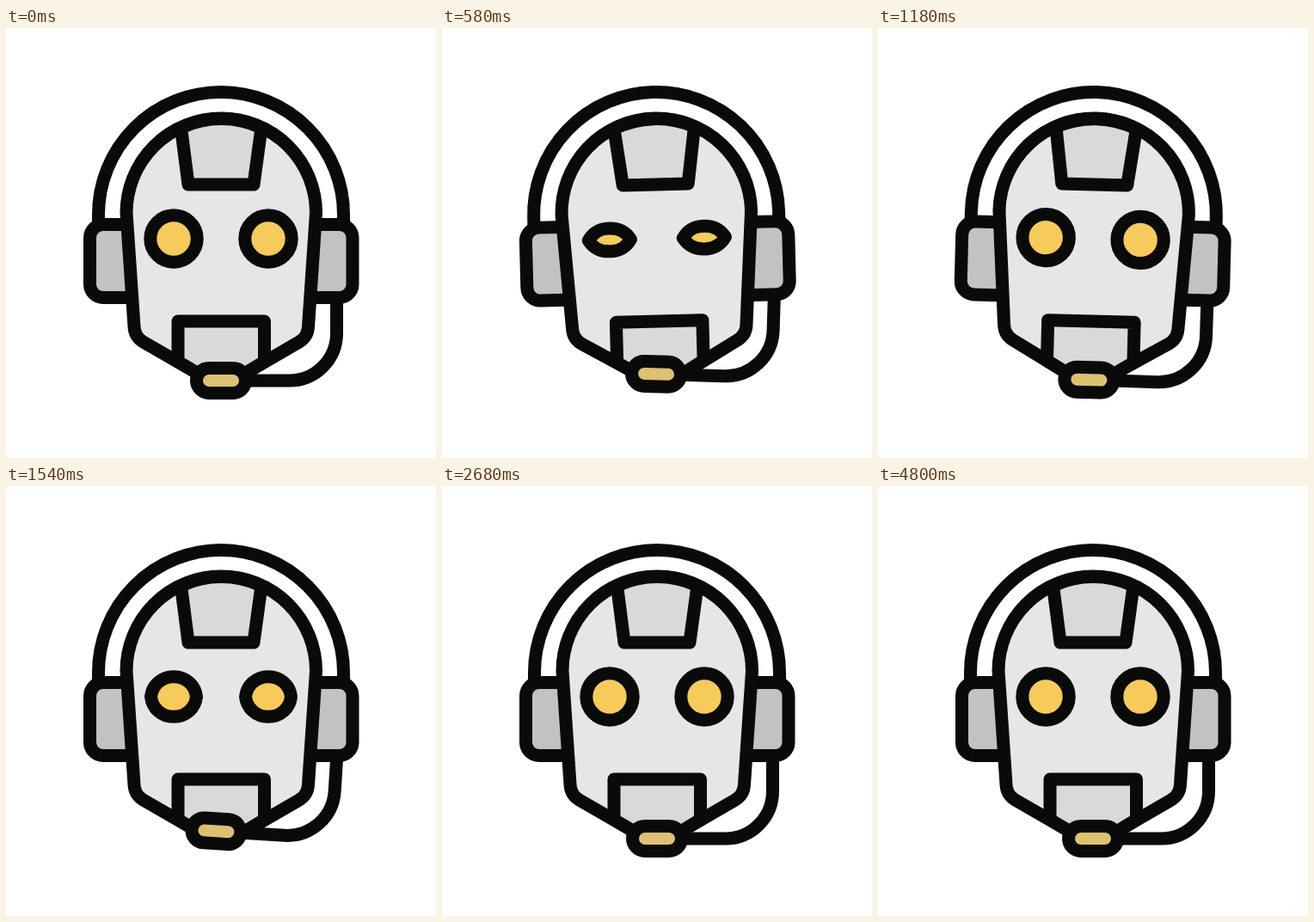
An HTML page for the animation above (4820 ms loop, 500 by 500 pixels).

```html
<!DOCTYPE html>
<html lang="en">
<head>
<meta charset="utf-8">
<title>Robot with headset</title>
<style>
  html, body { margin: 0; width: 100%; height: 100%; overflow: hidden; background: #fff; }
  svg { display: block; width: 100%; height: 100%; }
  path, rect { stroke: #0a0a0a; stroke-width: 15; stroke-linecap: round; stroke-linejoin: round; fill: none; }
  .ear { fill: #c2c2c2; }
  .face { fill: #e6e6e6; }
  .plate { fill: #d9d9d9; }
  .eye { fill: #f6cb5c; }
  .mic { fill: #dec073; }
</style>
</head>
<body>
<svg viewBox="0 0 500 500">
  <g id="head">
    <path d="M107.5 226V217A142.5 142.5 0 0 1 392.5 217V226"/>
    <path class="ear" d="M150 228.5H113A15.5 15.5 0 0 0 97.5 244V298A15.5 15.5 0 0 0 113 313.5H150Z"/>
    <g id="cable">
      <path d="M384.5 314V355A55 55 0 0 1 329.5 410H280"/>
    </g>
    <path class="ear" d="M350 228.5H387.500A15.500 15.500 0 0 1 403 244V298A15.500 15.500 0 0 1 387.500 313.500H350Z"/>
    <path class="face" d="M140 215A110.250 110 0 0 1 360.500 215L351.500 347Q351 359 341 365L279 401H222L159.500 365Q149.500 359 149 347Z"/>
    <path class="plate" d="M203.500 116A110.250 110 0 0 1 297 116L288 182H212Z"/>
    <path class="plate" d="M200 341H300.500V388L279 401H222L200 388Z"/>
    <path class="eye" id="left" transform="translate(195 245)"/>
    <path class="eye" id="right" transform="translate(305 245)"/>
    <g id="mic">
      <rect class="mic" x="221.500" y="395.500" width="57" height="29" rx="14.500"/>
    </g>
  </g>
</svg>
<script>
const LOOP = 4820;
const $ = id => document.getElementById(id);

// [time in ms, value] pairs, eased with a half cosine in between
const headKeys = [[0, 0], [240, 3.4], [690, -2.3], [1150, 1.5], [1500, 0]];
const micKeys = [[60, 0], [460, 8.7], [760, -6.9], [1040, 6], [1320, -5.2],
  [1590, 4.4], [1880, -3.7], [2160, 2.8], [2430, -1.9], [2680, 0]];
const eyeKeys = [[470, 1], [690, 0], [870, 1], [1487, 1], [1707, 0], [1890, 1]];

function valueAt(keys, t) {
  if (t <= keys[0][0]) return keys[0][1];
  for (let i = 1; i < keys.length; i++) {
    const [t0, a] = keys[i - 1], [t1, b] = keys[i];
    if (t < t1) return a + (b - a) * (1 - Math.cos(Math.PI * (t - t0) / (t1 - t0))) / 2;
  }
  return keys[keys.length - 1][1];
}

// A circle that narrows to a pointed lens and then to a line
function eyePath(open) {
  const w = 22 + 5.2 * open, h = 27.2 * open;
  const inX = w - 9 * (1 - open), inY = 15 * open, k = 12 + 3 * open;
  return `M${-w} 0C${-inX} ${-inY} ${-k} ${-h} 0 ${-h}S${inX} ${-inY} ${w} 0` +
    `C${inX} ${inY} ${k} ${h} 0 ${h}S${-inX} ${inY} ${-w} 0Z`;
}

function draw(t) {
  $('head').setAttribute('transform', `rotate(${valueAt(headKeys, t)} 250 250)`);
  const swing = `rotate(${valueAt(micKeys, t)} 384.5 318)`;
  $('cable').setAttribute('transform', swing);
  $('mic').setAttribute('transform', swing);
  const d = eyePath(valueAt(eyeKeys, t));
  $('left').setAttribute('d', d);
  $('right').setAttribute('d', d);
}

const start = performance.now();
function tick() {
  draw((performance.now() - start) % LOOP);
  requestAnimationFrame(tick);
}
draw(0);
requestAnimationFrame(tick);
</script>
</body>
</html>
```
